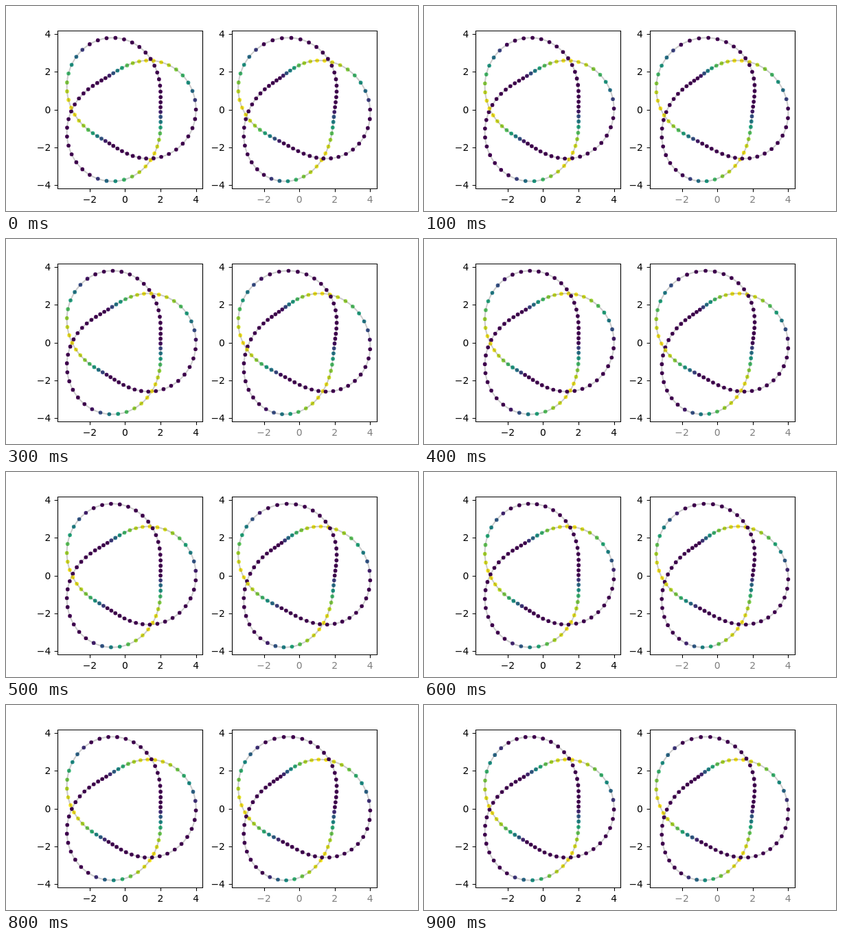
An HTML page for the animation above (1000 ms loop, 600 px wide and 300 px high).

```html
<!DOCTYPE html>
<html lang="en">
<head>
<meta charset="utf-8">
<title>Trefoil knot, two views</title>
<style>
  html, body { margin: 0; width: 100%; height: 100%; overflow: hidden; background: #fff; }
  svg { display: block; width: 600px; height: 300px; }
  text { font: 13.89px "DejaVu Sans", sans-serif; }
  .axis { fill: none; stroke: #000; stroke-width: 1.11; }
  .curve { fill: none; stroke: #000; stroke-opacity: .2; stroke-width: 2.08; stroke-linejoin: round; }
</style>
</head>
<body>
<svg id="stage" viewBox="0 0 600 300"></svg>
<script>
const COUNT = 99, STEPS = 10, STEP_MS = 100;
const TURN = 4 * Math.PI;
const TOP = 36, BOTTOM = 267, WIDTH = 465 / 2.2;
const VIRIDIS = ['440154', '472d7b', '3b528b', '2c728e', '21918c',
                 '28ae80', '5ec962', 'addc30', 'fde725']
  .map(h => [0, 2, 4].map(i => parseInt(h.slice(i, i + 2), 16)));

const stage = document.getElementById('stage');

function add(parent, tag, attrs, text) {
  const el = document.createElementNS('http://www.w3.org/2000/svg', tag);
  for (const name in attrs) el.setAttribute(name, attrs[name]);
  if (text !== undefined) el.textContent = text;
  return parent.appendChild(el);
}

// Trefoil on a torus; skew shifts x by depth for the second view.
function knot(t, skew) {
  const r = 3 + Math.cos(1.5 * t), z = Math.sin(1.5 * t);
  return { x: r * Math.cos(t) - skew * z, y: r * Math.sin(t), z };
}

function viridis(v) {
  const p = Math.min(Math.max(v, 0), 1) * (VIRIDIS.length - 1);
  const i = Math.min(Math.floor(p), VIRIDIS.length - 2);
  const mix = VIRIDIS[i].map((c, k) => Math.round(c + (VIRIDIS[i + 1][k] - c) * (p - i)));
  return `rgb(${mix})`;
}

const snap = v => Math.floor(v + 0.5) + 0.5;
const label = v => String(v).replace('-', '\u2212');
const views = [
  { left: 75, skew: 0, ink: '#000' },
  { left: 540 - WIDTH, skew: 0.18, ink: '#808080' }
];

// Both views share limits with a 5% margin around the data.
const SAMPLES = 720;
for (const view of views)
  view.points = Array.from({ length: SAMPLES }, (_, i) => knot(TURN * i / SAMPLES, view.skew));
const all = views.flatMap(v => v.points);
const xs = all.map(p => p.x), ys = all.map(p => p.y);
const xMin = Math.min(...xs), yMax = Math.max(...ys);
const xScale = WIDTH / 1.1 / (Math.max(...xs) - xMin);
const yScale = (BOTTOM - TOP) / 2.2 / yMax;

const px = (view, x) => view.left + WIDTH * 0.05 / 1.1 + (x - xMin) * xScale;
const py = y => (TOP + BOTTOM) / 2 - y * yScale;

for (const view of views) {
  view.dots = Array.from({ length: COUNT }, () => add(stage, 'circle', { r: 2.85 }));

  const d = view.points.map(p => px(view, p.x).toFixed(2) + ' ' + py(p.y).toFixed(2));
  add(stage, 'path', { class: 'curve', d: 'M' + d.join('L') + 'Z' });

  const x0 = snap(view.left), x1 = snap(view.left + WIDTH);
  const y0 = snap(TOP), y1 = snap(BOTTOM);
  let axis = `M${x0} ${y0}H${x1}V${y1}H${x0}Z`;
  for (const v of [-2, 0, 2, 4]) {
    const x = px(view, v);
    axis += `M${snap(x)} ${y1}v4.86`;
    add(stage, 'text', { x, y: 288, 'text-anchor': 'middle', fill: view.ink }, label(v));
  }
  for (const v of [-4, -2, 0, 2, 4]) {
    const y = py(v);
    axis += `M${x0} ${snap(y)}h-4.86`;
    add(stage, 'text', { x: view.left - 9.7, y: Math.round(y + 5), 'text-anchor': 'end' }, label(v));
  }
  add(stage, 'path', { class: 'axis', d: axis });
}

let shown = -1;

function draw() {
  const step = Math.floor(performance.now() / STEP_MS) % STEPS;
  if (step !== shown) {
    shown = step;
    for (const view of views) {
      view.dots.forEach((dot, i) => {
        const p = knot(TURN * (i + step / STEPS) / COUNT, view.skew);
        dot.setAttribute('cx', px(view, p.x).toFixed(2));
        dot.setAttribute('cy', py(p.y).toFixed(2));
        dot.setAttribute('fill', viridis(p.z));
      });
    }
  }
  requestAnimationFrame(draw);
}
draw();
</script>
</body>
</html>
```
